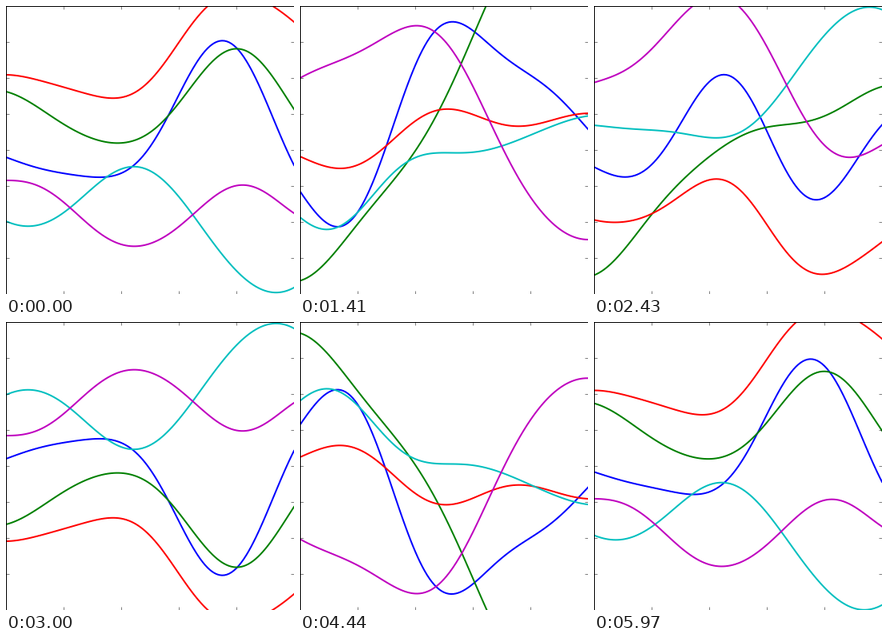
Write a matplotlib script that moves like this. It is 360 px wide and 360 px high and loops after 6 s.

```python
import numpy as np
import matplotlib.pyplot as plt
from matplotlib.animation import FuncAnimation

SIZE, DPI = 360, 72
FRAMES, INTERVAL = 200, 30
SCALE = 72  # smoothness of the curves, in pixels

# Key heights above the middle: one pose, and the pose a quarter loop later.
POSES = {
    "b": ([-9, -27, -34, 4, 112, 112, -19],
          [-51, -89, 44, 158, 119, 75, 28]),
    "g": ([73, 40, 11, 22, 90, 124, 51],
          [-171, -112, -35, 60, 189, 268, 216]),
    "r": ([94, 82, 66, 87, 167, 195, 160],
          [-17, -30, 10, 43, 20, 15, 31]),
    "c": ([-89, -86, -38, -26, -90, -162, -172],
          [-76, -81, -22, -1, 10, 39, 59]),
    "m": ([-38, -56, -106, -117, -75, -44, -79],
          [94, 122, 159, 149, 37, -71, -105]),
}


def kernel(p, q):
    return np.exp(-0.5 * ((p[:, None] - q) / SCALE) ** 2)


def smooth(heights):
    """Smooth curve over x through evenly spaced heights."""
    knots = np.linspace(0, SIZE, len(heights))
    return kernel(x, knots) @ np.linalg.solve(kernel(knots, knots), heights)


x = np.linspace(0, SIZE, 121)

fig = plt.figure(figsize=(SIZE / DPI, SIZE / DPI), dpi=DPI, facecolor="w")
ax = fig.add_axes([0, 0, 1, 1])
ax.set(xlim=(0, SIZE), ylim=(-SIZE / 2, SIZE / 2),
       xticks=np.linspace(0, SIZE, 6),
       yticks=np.linspace(-SIZE / 2, SIZE / 2, 9))
ax.tick_params(direction="in", length=4, width=0.5, top=True, right=True,
               labelbottom=False, labelleft=False)
ax.set_axisbelow(False)
for spine in ax.spines.values():
    spine.set_linewidth(1)

curves = [(ax.plot(x, 0 * x, color=color, lw=2)[0], smooth(start), smooth(quarter))
          for color, (start, quarter) in POSES.items()]


def update(i):
    t = 2 * np.pi * i / FRAMES
    for line, start, quarter in curves:
        line.set_ydata(start * np.cos(t) + quarter * np.sin(t))
    return [line for line, _, _ in curves]


anim = FuncAnimation(fig, update, frames=FRAMES, interval=INTERVAL,
                     repeat=True, repeat_delay=0)
plt.show()
```
